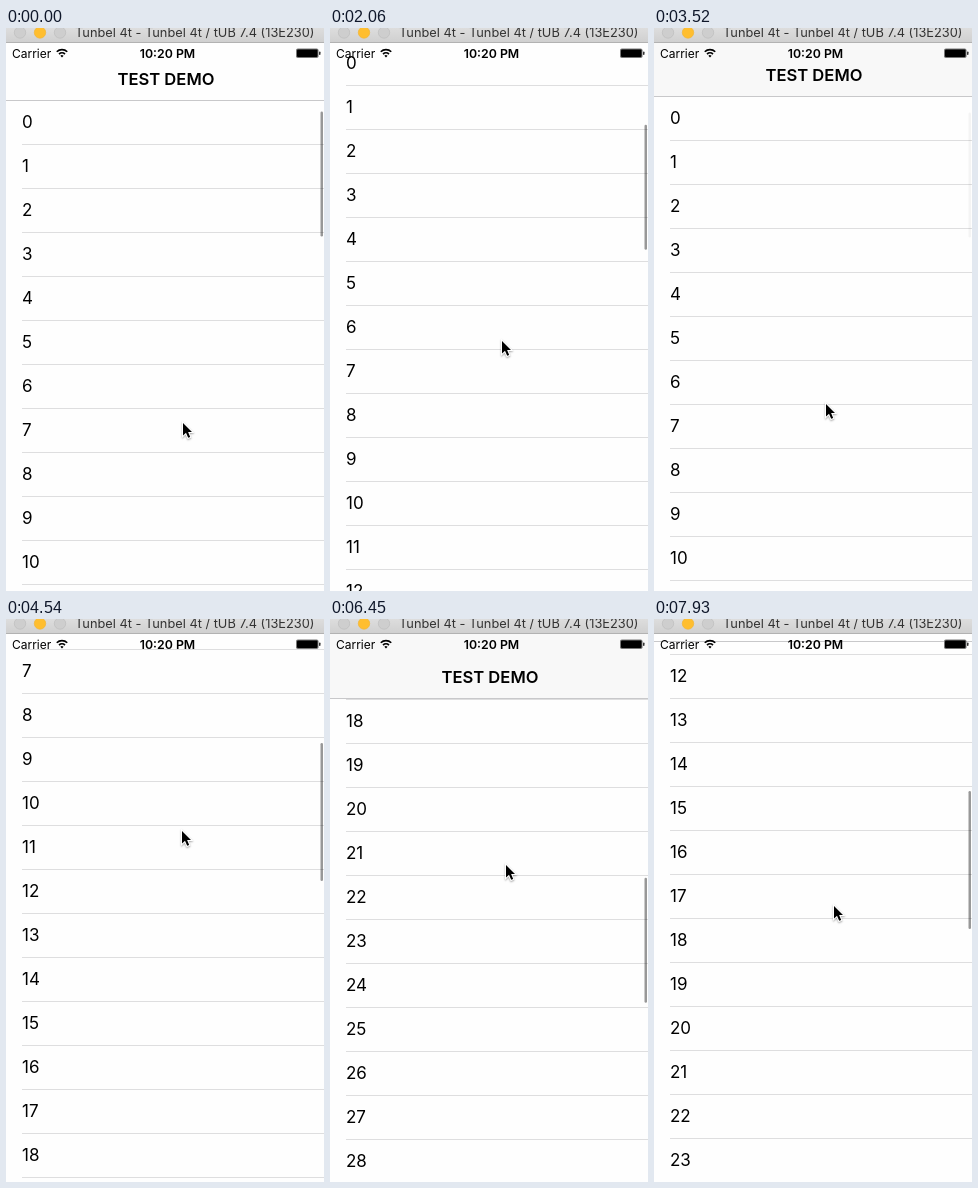
These frames come from a looping animation (318 by 563 pixels, 8000 ms). An HTML page with a canvas:

```html
<!DOCTYPE html>
<html lang="en">
<head>
<meta charset="utf-8">
<title>Test demo</title>
<style>
html, body { margin: 0; width: 100%; height: 100%; overflow: hidden; background: #fefefe; }
canvas { display: block; }
</style>
</head>
<body>
<canvas id="stage" width="318" height="563"></canvas>
<script>
const W = 318, H = 563, LOOP = 8000, STEP = 440 / 3, LAST = 54;
const ROW = 44, BAR_MIN = 13, BAR_MAX = 79;
const c = document.getElementById('stage').getContext('2d');

// Drags are linear (power 1), flings slow down; dx and dy move the pointer.
const gestures = [
  { from: 0, to: 7, scroll: 29, power: 1, dx: 0, dy: -47 },
  { from: 7, to: 14, scroll: 30, power: 1, dx: -5, dy: -35 },
  { from: 14, to: 21, scroll: -55, power: 1, dx: 0, dy: 63 },
  { from: 24, to: 32, scroll: 396, power: 1, dx: 4, dy: -188 },
  { from: 32, to: 41, scroll: 484, power: 2.5, dx: 0, dy: 0 },
  { from: 43, to: 50, scroll: -376, power: 2, dx: -1, dy: 220 },
  { from: 51, to: 54, scroll: 57, power: 1, dx: 5, dy: -121 }
];

function poseAt(k, prev) {
  const pose = { scroll: 7, x: 177, y: 394 };
  for (const g of gestures) {
    const p = Math.min(1, Math.max(0, (k - g.from) / (g.to - g.from)));
    const eased = 1 - (1 - p) ** g.power;
    pose.scroll += g.scroll * eased;
    pose.x += g.dx * eased;
    pose.y += g.dy * eased;
  }
  // The header follows the list within its limits and is tinted while coming back.
  const move = prev ? prev.scroll - pose.scroll : 0;
  const still = Math.abs(move) < 0.01;
  pose.bar = prev ? Math.min(BAR_MAX, Math.max(BAR_MIN, prev.bar + move)) : BAR_MAX - pose.scroll;
  pose.tinted = still ? !!prev && prev.tinted : move > 0;
  pose.idle = still && prev ? prev.idle + 1 : 0;
  return pose;
}

const poses = [];
for (let k = 0; k <= LAST; k++) poses.push(poseAt(k, poses[k - 1]));

function box(x, y, w, h, fill) {
  c.fillStyle = fill;
  c.fillRect(x, y, w, h);
}

function text(str, x, y, size, weight = 400, align = 'left', fill = '#000') {
  c.font = `${weight} ${size}px Inter, sans-serif`;
  c.textAlign = align;
  c.fillStyle = fill;
  c.fillText(str, x, y);
}

function pill(x, y, w, h, r, fill) {
  c.beginPath();
  c.roundRect(x, y, w, h, r);
  c.fillStyle = fill;
  c.fill();
}

function drawList(scroll) {
  const first = Math.max(0, Math.floor((scroll - 101) / ROW));
  for (let n = first; n < first + 15; n++) {
    const y = Math.round(101 - scroll + n * ROW);
    text(n, 16, y + 6, 17);
    box(16, y + 22, W, 1, '#dededf');
  }
}

function drawIndicator({ scroll, bar, idle }) {
  const tall = bar < 30 && scroll > 100;
  const y = (tall ? 44.2 : 82) + scroll * 0.2235;
  pill(314.5, y, 2.5, tall ? 138 : 125, 1.25, `rgba(0,0,0,${idle > 2 ? 0.04 : 0.4})`);
}

function drawHeader({ bar, tinted }) {
  const y = Math.round(bar);
  box(0, 15, W, y - 15, tinted ? '#f8f8f8' : '#fefefe');
  box(0, y, W, 1, '#c8c8ca');
  text('TEST DEMO', 160, y - 15, 16.6, 600, 'center');
}

function drawStatus() {
  text('Carrier', 6, 30, 12);
  text('10:20 PM', 161.5, 30, 12.3, 600, 'center');
  c.strokeStyle = '#000';
  c.lineWidth = 1.7;
  for (const r of [4.2, 7.4]) {
    c.beginPath();
    c.arc(56, 29, r, -Math.PI * 0.75, -Math.PI * 0.25);
    c.stroke();
  }
  c.beginPath();
  c.moveTo(56, 29.5);
  c.arc(56, 29, 2, -Math.PI * 0.8, -Math.PI * 0.2);
  c.fillStyle = '#000';
  c.fill();
  pill(290, 20.5, 22.5, 9.5, 1.8, '#777');
  pill(291, 21.5, 20.5, 7.5, 1, '#000');
  pill(313, 23.5, 1.5, 3.5, 0.7, '#333');
}

function drawWindowBar() {
  const shade = c.createLinearGradient(0, 0, 0, 14);
  shade.addColorStop(0, '#dddddd');
  shade.addColorStop(1, '#d0d0d0');
  box(0, 0, W, 14, shade);
  box(0, 14, W, 1, '#b2b2b2');
  ['#cecece', '#ffbe2f', '#cecece'].forEach((fill, i) => {
    c.beginPath();
    c.arc(14 + i * 20, 4.5, 5.7, 0, 7);
    c.fillStyle = fill;
    c.fill();
    c.strokeStyle = i === 1 ? '#f3b534' : '#bebebe';
    c.lineWidth = 0.7;
    c.stroke();
  });
  text('Tunbel 4t - Tunbel 4t / tUB 7.4 (13E230)', 69, 9, 12.8, 400, 'left', '#333');
}

const arrow = new Path2D('M0 1V13.6L3 10.8L5.2 15.8L7.2 14.9L5.1 10H9Z');

function drawPointer(x, y) {
  c.save();
  c.translate(Math.round(x), Math.round(y));
  c.shadowColor = 'rgba(0,0,0,.35)';
  c.shadowBlur = 2;
  c.shadowOffsetY = 1;
  c.strokeStyle = '#fff';
  c.lineWidth = 2;
  c.stroke(arrow);
  c.shadowColor = 'transparent';
  c.fillStyle = '#000';
  c.fill(arrow);
  c.restore();
}

function draw(now) {
  const k = Math.min(LAST, Math.floor((now % LOOP + 18) / STEP));
  const pose = poses[k];
  box(0, 0, W, H, '#fefefe');
  drawList(pose.scroll);
  drawIndicator(pose);
  drawHeader(pose);
  drawStatus();
  drawWindowBar();
  drawPointer(pose.x, pose.y);
}

const start = performance.now();
function tick() {
  draw(performance.now() - start);
  requestAnimationFrame(tick);
}
tick();
</script>
</body>
</html>
```
